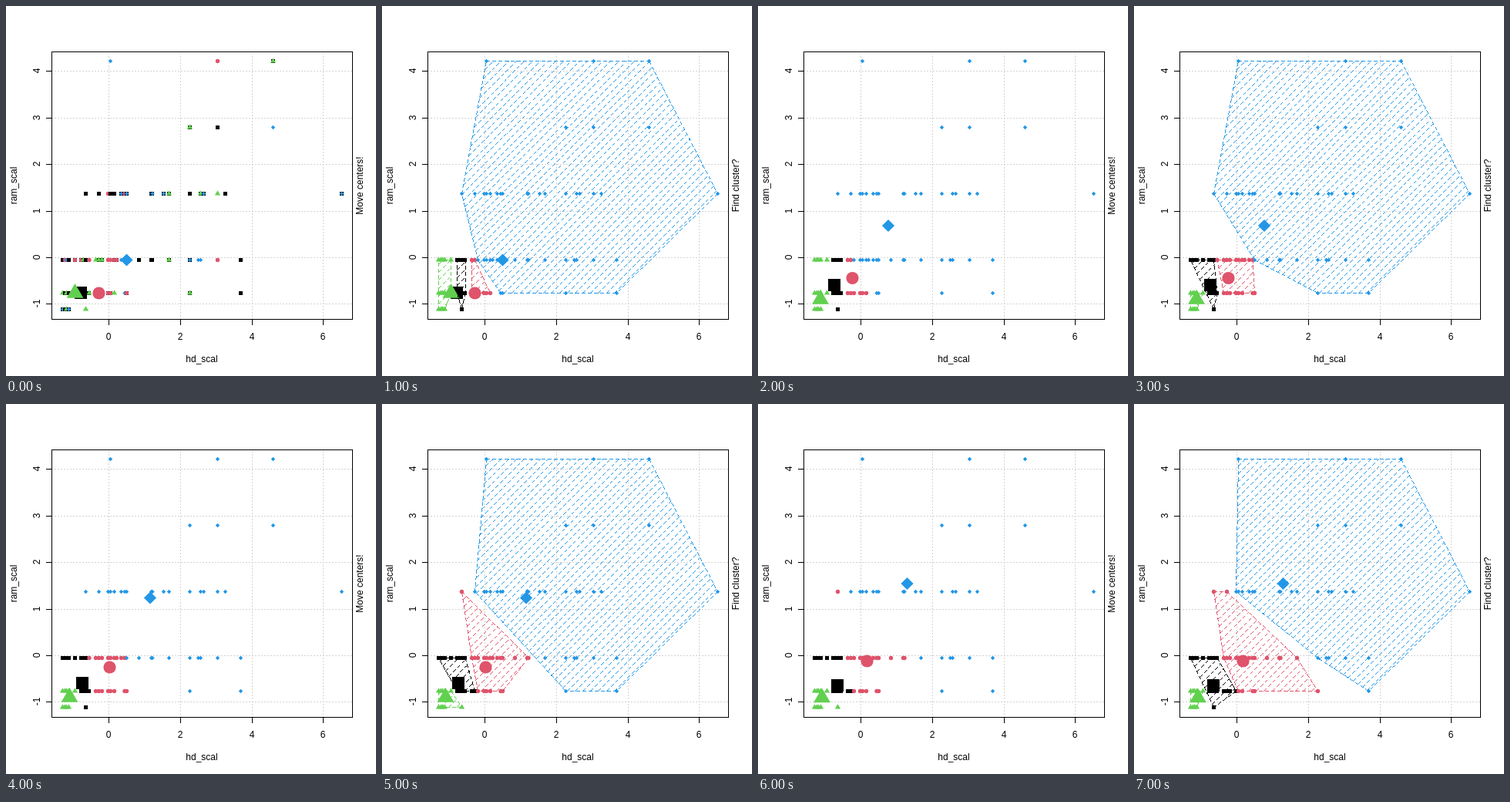
An HTML page with a canvas for the animation above (8 s loop, 480x480 px).

```html
<!DOCTYPE html>
<html>
<head>
<meta charset="utf-8">
<style>
html, body { margin: 0; height: 100%; overflow: hidden; background: #fff; }
canvas { display: block; }
</style>
</head>
<body>
<canvas id="plot" width="480" height="480"></canvas>
<script>
const ctx = document.getElementById('plot').getContext('2d');
const UNIT_X = 46.4, UNIT_Y = 60.45, ZERO_X = 133, ZERO_Y = 326;
const COLORS = ['#000', '#df536b', '#61d04f', '#2297e6'];

// Shared columns, and the spans of them that each memory size occupies.
const COLUMNS = [73, 76, 78, 81, 89, 97, 100, 103, 107.5, 116, 120, 124, 132, 135, 140, 143, 149,
  153.5, 156, 172, 188, 189.5, 204, 211, 238, 249, 252, 256, 274, 284, 304, 346, 435];
const SPANS = {
  2: '73-81 103',
  4: '73-140 153-156 238 304',
  8: '73-189.5 211-252 274 304',
  16: '103 120 132-140 149-156 188-211 238 252-284 435',
  24: '238 274 346',
  32: '135 274 346'
};
const points = [];
for (const ram in SPANS)
  for (const span of SPANS[ram].split(' ')) {
    const [from, to = from] = span.split('-').map(Number);
    for (const x of COLUMNS)
      if (x >= from && x <= to) points.push({ x, y: Math.round(414.8 - 10.74 * ram) });
  }

let seed = 7;
const random = () => (seed = seed * 16807 % 2147483647) / 2147483647;
// Random start: most points have a black one underneath.
const startGroups = points.map(p => {
  p.onBlack = random() < .65;
  return Math.floor(random() * 4);
});

// Centers per round, in group order.
const CENTERS = [
  [[97, 372], [120, 372], [89, 372], [156, 329]],
  [[98.5, 362], [122, 352.5], [80.5, 380], [168.5, 284.5]],
  [[99, 362], [134, 341], [82, 380], [186.5, 251]],
  [[102.5, 364.5], [141, 333], [82.5, 380.5], [193, 232.5]]
];

function nearest(p, centers) {
  const d = centers.map(([x, y]) => Math.hypot((p.x - x) / UNIT_X, (p.y - y) / UNIT_Y));
  return d.indexOf(Math.min(...d));
}
const rounds = [startGroups, ...CENTERS.map(c => points.map(p => nearest(p, c)))];

function marker(group, x, y, r) {
  ctx.fillStyle = COLORS[group];
  ctx.beginPath();
  if (group === 0) {
    const size = Math.round(2 * r);
    ctx.rect(Math.round(x + .5 - r), Math.round(y + .5 - r), size, size);
  } else if (group === 1) {
    ctx.arc(x + .5, y + .5, r, 0, 7);
  } else if (group === 2) {
    ctx.moveTo(x + .5, y + .5 - r * 1.555);
    ctx.lineTo(x + .5 + r * 1.347, y + .5 + r * .778);
    ctx.lineTo(x + .5 - r * 1.347, y + .5 + r * .778);
  } else {
    for (const [dx, dy] of [[0, -r], [r, 0], [0, r], [-r, 0]])
      ctx.lineTo(x + .5 + dx, y + .5 + dy);
  }
  ctx.fill();
}

// Crisp one-pixel line without smoothing.
function line(x1, y1, x2, y2, on = 1, period = 1) {
  const dx = x2 - x1, dy = y2 - y1;
  const steps = Math.round(Math.max(Math.abs(dx), Math.abs(dy))) || 1;
  const stride = Math.hypot(dx, dy) / steps;
  for (let i = 0; i <= steps; i++)
    if (period === 1 || i * stride % period < on)
      ctx.fillRect(Math.round(x1 + dx * i / steps), Math.round(y1 + dy * i / steps), 1, 1);
}

function text(str, x, y, turned) {
  ctx.save();
  ctx.translate(x, y);
  if (turned) ctx.rotate(-Math.PI / 2);
  ctx.fillText(str, 0, 0);
  ctx.restore();
}

function hull(pts) {
  const sorted = [...pts].sort((a, b) => a.x - b.x || a.y - b.y);
  const half = list => {
    const out = [];
    for (const p of list) {
      while (out.length > 1) {
        const [a, b] = out.slice(-2);
        if ((b.x - a.x) * (p.y - a.y) - (b.y - a.y) * (p.x - a.x) > 0) break;
        out.pop();
      }
      out.push(p);
    }
    return out.slice(0, -1);
  };
  return [...half(sorted), ...half(sorted.reverse())];
}

function hatchedHull(group, pts) {
  const corners = hull(pts);
  const edges = corners.map((p, i) => [p, corners[(i + 1) % corners.length]]);
  const gap = 7.2 * Math.SQRT2;
  ctx.fillStyle = COLORS[group];
  for (let k = -30; k < 35; k++) {
    const sum = ZERO_X + ZERO_Y + k * gap, xs = [];
    for (const [a, b] of edges) {
      const da = a.x + a.y - sum, db = b.x + b.y - sum;
      if (da * db < 0) xs.push(a.x + (b.x - a.x) * da / (da - db));
    }
    if (xs.length < 2) continue;
    const left = Math.min(...xs), right = Math.max(...xs);
    line(left, sum - left, right, sum - right, 5, 8);
  }
  for (const [a, b] of edges) line(a.x, a.y, b.x, b.y, 5, 8);
}

function drawAxes(note) {
  ctx.fillStyle = '#fff';
  ctx.fillRect(0, 0, 480, 480);
  const xTicks = [0, 2, 4, 6].map(v => [v, Math.round(ZERO_X + v * UNIT_X)]);
  const yTicks = [-1, 0, 1, 2, 3, 4].map(v => [v, Math.round(ZERO_Y - v * UNIT_Y)]);
  ctx.fillStyle = '#d3d3d3';
  for (const [, x] of xTicks) line(x, 406, x, 59, 2, 4);
  for (const [, y] of yTicks) line(59, y, 449, y, 2, 4);

  ctx.fillStyle = '#000';
  ctx.font = '12px "Liberation Sans", Arial, sans-serif';
  ctx.textAlign = 'center';
  for (const [v, x] of xTicks) { line(x, 406, x, 413); text(v, x, 433); }
  for (const [v, y] of yTicks) { line(52, y, 59, y); text(v, 44, y, true); }
  line(59, 59, 449, 59);
  line(59, 406, 449, 406);
  line(59, 59, 59, 406);
  line(449, 59, 449, 406);
  text('hd_scal', 254, 462);
  text('ram_scal', 14, 233, true);
  text(note, 463, 233, true);
}

function draw(step) {
  const round = step >> 1, finding = step % 2;
  const groups = rounds[round + finding];
  drawAxes(finding ? 'Find cluster?' : 'Move centers!');
  points.forEach((p, i) => {
    if (step === 0 && p.onBlack) marker(0, p.x, p.y, 2.7);
    marker(groups[i], p.x, p.y, 2.7);
  });
  CENTERS[round].forEach(([x, y], g) => marker(g, x, y, 8.1));
  if (finding)
    for (let g = 0; g < 4; g++) hatchedHull(g, points.filter((p, i) => groups[i] === g));
}

let shown = -1;
const start = performance.now();
function tick() {
  const step = Math.floor((performance.now() - start) / 1000) % 8;
  if (step !== shown) draw(shown = step);
  requestAnimationFrame(tick);
}
tick();
</script>
</body>
</html>
```
